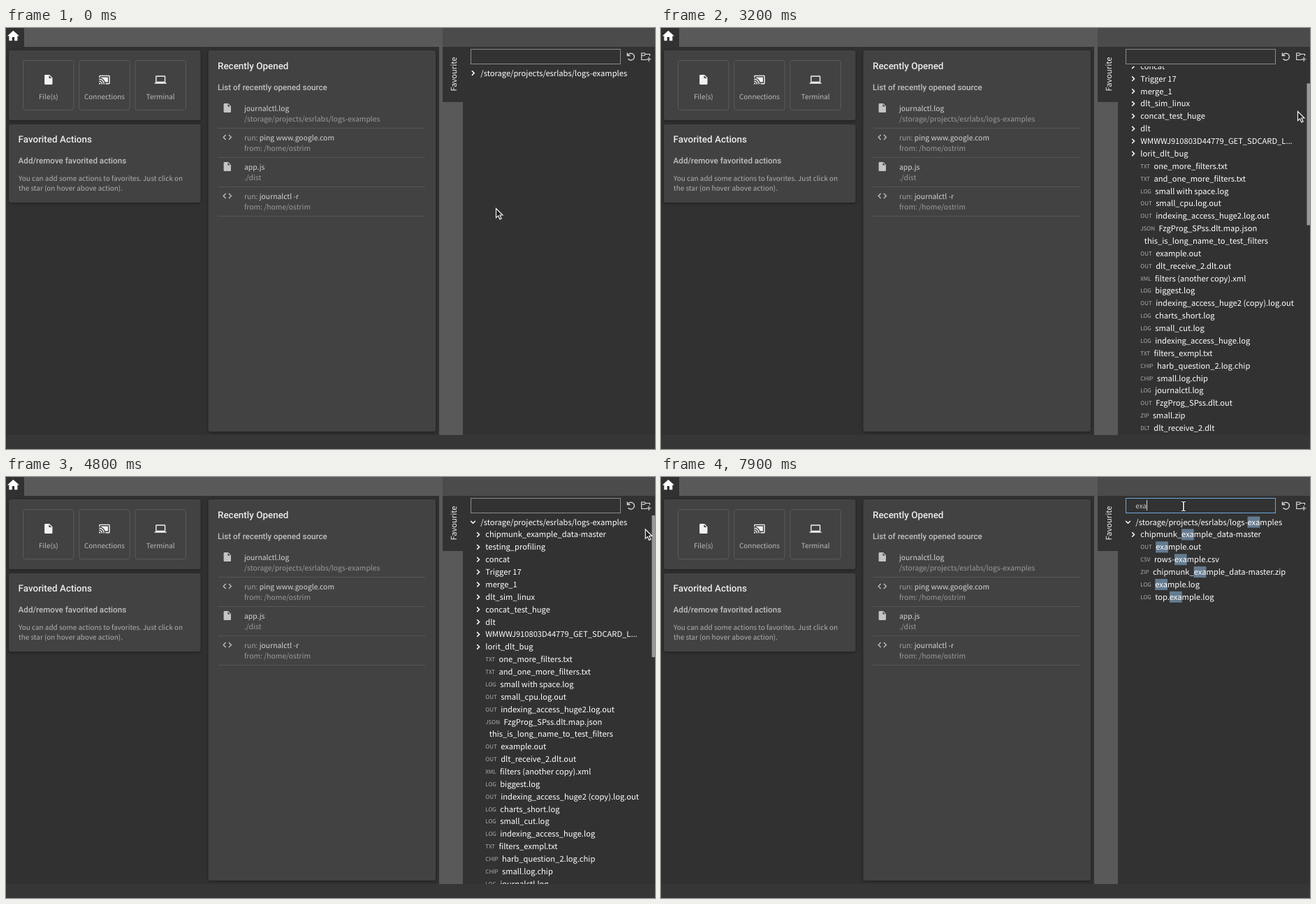
An HTML page with a canvas that plays this animation: 929 by 603 pixels, repeating every 8000 ms.

```html
<!DOCTYPE html>
<html lang="en">
<head>
<meta charset="utf-8">
<title>Favourite folders</title>
<style>
html, body { margin: 0; width: 100%; height: 100%; overflow: hidden; background: #313131; }
canvas { display: block; width: 929px; height: 603px; }
</style>
</head>
<body>
<canvas id="stage"></canvas>
<script>
const W = 929, H = 603, LOOP = 8000;
const ROW = 17.87, TOP = 55, VIEW = 528, FIRST = 64.6;
const NAME = 11.16, TAG = 7.98, ITEM = 10.34, SMALL = 9.92;
const SANS = '"Noto Sans CJK JP", "Noto Sans CJK SC", "Noto Sans CJK", "Noto Sans", sans-serif';
const HEAD = 'Roboto, sans-serif';

const canvas = document.getElementById('stage');
const dpr = window.devicePixelRatio || 1;
canvas.width = W * dpr;
canvas.height = H * dpr;
const ctx = canvas.getContext('2d');

const ICONS = {
  home: 'M10 20v-6h4v6h5v-8h3L12 3 2 12h3v8z',
  file: 'M6 2c-1.1 0-2 .9-2 2v16c0 1.1.9 2 2 2h12c1.1 0 2-.9 2-2V8l-6-6H6zm7 7V3.5L18.5 9H13z',
  cast: 'M1 18v3h3c0-1.66-1.34-3-3-3zm0-4v2c2.76 0 5 2.24 5 5h2c0-3.87-3.13-7-7-7zm18-7H5v1.63c3.96 1.28 7.09 4.41 8.37 8.37H19V7zM1 10v2c4.97 0 9 4.03 9 9h2c0-6.08-4.93-11-11-11zm20-7H3c-1.1 0-2 .9-2 2v3h2V5h18v14h-7v2h7c1.1 0 2-.9 2-2V5c0-1.1-.9-2-2-2z',
  laptop: 'M20 18c1.1 0 2-.9 2-2V6c0-1.1-.9-2-2-2H4c-1.1 0-2 .9-2 2v10c0 1.1.9 2 2 2H0v2h24v-2h-4zM4 6h16v10H4V6z',
  code: 'M9.4 16.6 4.8 12l4.6-4.6L8 6l-6 6 6 6 1.4-1.4zm5.2 0 4.6-4.6-4.6-4.6L16 6l6 6-6 6-1.4-1.4z',
  folder: 'M8.5 5H.7V-4.5H5L6.5-3H12.5V-.5M.7-1.2H5L6.5-3M11.2 1V7.4M8 4.2H14.4',
  arrow: 'M0 0V13.2L3.1 10.4 5.3 15.4 7.6 14.4 5.4 9.5H9.4z'
};
for (const k in ICONS) ICONS[k] = new Path2D(ICONS[k]);

const root = '/storage/projects/esrlabs/logs-examples';
const folders = ['chipmunk_example_data-master', 'testing_profiling', 'concat', 'Trigger 17', 'merge_1',
  'dlt_sim_linux', 'concat_test_huge', 'dlt', 'WMWWJ910803D44779_GET_SDCARD_L...', 'lorit_dlt_bug'];
const files = ['TXT:one_more_filters.txt', 'TXT:and_one_more_filters.txt', 'LOG:small with space.log',
  'OUT:small_cpu.log.out', 'OUT:indexing_access_huge2.log.out', 'JSON:FzgProg_SPss.dlt.map.json',
  ':this_is_long_name_to_test_filters', 'OUT:example.out', 'OUT:dlt_receive_2.dlt.out',
  'XML:filters (another copy).xml', 'LOG:biggest.log', 'OUT:indexing_access_huge2 (copy).log.out',
  'LOG:charts_short.log', 'LOG:small_cut.log', 'LOG:indexing_access_huge.log', 'TXT:filters_exmpl.txt',
  'CHIP:harb_question_2.log.chip', 'CHIP:small.log.chip', 'LOG:journalctl.log', 'OUT:FzgProg_SPss.dlt.out',
  'ZIP:small.zip', 'DLT:dlt_receive_2.dlt', 'CSV:rows-example.csv', 'OUT:text.pcanng.out',
  'LOG:tefis_trace.log', 'TXT:filters_exmpl_tr.txt', 'ZIP:chipmunk_example_data-master.zip',
  'TXT:filters_exmpl (copy).txt', 'LOG:example.log', 'LOG:index_large.log', 'TXT:text_sample.txt',
  'LOG:top.example.log'];
const rows = [{ name: root, x: 679.3, chevron: 668.5 }]
  .concat(folders.map(name => ({ name, x: 686.3, chevron: 675.8 })),
    files.map(f => { const [tag, name] = f.split(':'); return { name, tag, x: 686.3 }; }));

// time, x, y of the pointer tip
const pointer = [[400, 701, 258], [600, 690, 205], [800, 660, 110], [900, 649, 50], [1000, 655, 33],
  [1200, 668, 54], [1300, 670, 62], [1500, 670, 62], [1800, 702, 72], [2100, 768, 87], [2400, 812, 95],
  [2600, 895, 95], [2700, 924, 94], [3000, 924, 94], [3200, 911, 119], [3500, 908, 162], [4000, 908, 162],
  [4100, 906, 152], [4500, 917, 106], [4900, 914, 64], [5000, 888, 56], [5200, 785, 43], [5300, 748, 42]];
const scrolling = [[3000, 0], [3200, 63.4], [3400, 145], [3500, 174.9], [4100, 174.9], [4200, 157],
  [4500, 75.2], [4800, 0]];

function track(keys, t) {
  if (t <= keys[0][0]) return keys[0].slice(1);
  for (let i = 1; i < keys.length; i++) {
    const a = keys[i - 1], b = keys[i];
    if (t <= b[0]) {
      const k = (t - a[0]) / (b[0] - a[0]);
      return a.slice(1).map((v, j) => v + (b[j + 1] - v) * k);
    }
  }
  return keys[keys.length - 1].slice(1);
}

function rect(x, y, w, h, color) {
  ctx.fillStyle = color;
  ctx.fillRect(x, y, w, h);
}

function text(s, x, y, size, color, font = SANS, weight = 400, align = 'left') {
  ctx.font = `${weight} ${size}px ${font}`;
  ctx.fillStyle = color;
  ctx.textAlign = align;
  ctx.fillText(s, x, y);
  return ctx.measureText(s).width;
}

function icon(name, cx, cy, size, color) {
  ctx.save();
  ctx.translate(cx - size / 2, cy - size / 2);
  ctx.scale(size / 24, size / 24);
  ctx.fillStyle = color;
  ctx.fill(ICONS[name]);
  ctx.restore();
}

function line(points, color, width) {
  ctx.beginPath();
  points.forEach(([x, y]) => ctx.lineTo(x, y));
  ctx.strokeStyle = color;
  ctx.lineWidth = width;
  ctx.stroke();
}

function card(x, y, w, h) {
  ctx.save();
  ctx.shadowColor = 'rgba(0,0,0,.4)';
  ctx.shadowBlur = 4 * dpr;
  ctx.shadowOffsetY = dpr;
  ctx.beginPath();
  ctx.roundRect(x, y, w, h, 3);
  ctx.fillStyle = '#424242';
  ctx.fill();
  ctx.restore();
}

function drawFrame() {
  rect(0, 0, W, H, '#313131');
  rect(26, 0, 599, 27, '#595959');
  rect(625, 0, 304, 27, '#4b4b4b');
  icon('home', 10.4, 11.4, 20.5, '#fff');
  rect(620, 27, 34, 556, '#595959');
  rect(625, 27, 29, 79, '#323232');
  rect(654, 27, 275, 556, '#323232');
  rect(0, 583, W, 20, '#363636');

  ctx.save();
  ctx.translate(645, 66);
  ctx.rotate(-Math.PI / 2);
  text('Favourite', 0, 0, NAME, '#f0f0f0', SANS, 400, 'center');
  ctx.restore();
}

function drawCards() {
  card(4, 32, 274.5, 100);
  card(4, 138, 274.5, 112);
  card(289.5, 32, 325.5, 546);

  [['file', 'File(s)'], ['cast', 'Connections'], ['laptop', 'Terminal']].forEach(([name, label], i) => {
    const x = 24.5 + i * 80.2;
    ctx.beginPath();
    ctx.roundRect(x, 46.5, 72.5, 71, 3);
    ctx.strokeStyle = '#5b5b5b';
    ctx.lineWidth = 1;
    ctx.stroke();
    icon(name, x + 36.3, 74, 17, '#f2f2f2');
    text(label, x + 36.3, 102, SMALL, '#bcbcbc', SANS, 400, 'center');
  });

  text('Favorited Actions', 17.6, 163.7, 13.45, '#ececec', HEAD, 500);
  text('Add/remove favorited actions', 17.6, 194, 11.62, '#c2c2c2', HEAD, 500);
  text('You can add some actions to favorites. Just click on', 18, 219, SMALL, '#b0b0b0');
  text('the star (on hover above action).', 18, 233.3, SMALL, '#b0b0b0');

  text('Recently Opened', 303, 58.5, 13.45, '#ececec', HEAD, 500);
  text('List of recently opened source', 303, 88.5, 11.62, '#c2c2c2', HEAD, 500);
  [['file', '', 'journalctl.log', root],
   ['code', 'run: ', 'ping www.google.com', 'from: /home/ostrim'],
   ['file', '', 'app.js', './dist'],
   ['code', 'run: ', 'journalctl -r', 'from: /home/ostrim']].forEach(([name, lead, title, sub], i) => {
    const y = 42 * i;
    icon(name, 316.8, 114.5 + y, 15.6, '#c4c4c4');
    const w = lead ? text(lead, 341, 118.8 + y, ITEM, '#a0a0a0') : 0;
    text(title, 341 + w, 118.8 + y, ITEM, '#d4d4d4');
    text(sub, 341, 134 + y, ITEM, '#9a9a9a');
    rect(303.5, 143 + y, 296.5, 1, '#565656');
  });
}

function drawSearch(t, query, x, y) {
  const over = x > 665 && x < 880 && y > 30 && y < 52;
  const color = t >= 5500 ? '#6ea8dc' : over ? '#b8b8b8' : '#8c8c8c';
  ctx.strokeStyle = color;
  ctx.lineWidth = 1;
  ctx.strokeRect(665.5, 30.5, 214, 21);
  const w = text(query, 679.3, 44.7, SMALL, '#c8c8c8');
  const blink = (t >= 6100 && t < 6300) || (t >= 7300 && t < 7900);
  if (t >= 5600 && !blink) rect(Math.round(679 + w), query ? 33 : 34, 1, 15, '#d8d8d8');

  ctx.strokeStyle = '#e2e2e2';
  ctx.lineWidth = 1.3;
  ctx.beginPath();
  ctx.arc(894.5, 41.2, 4.9, -2.6, 2.5);
  ctx.stroke();
  line([[889.4, 35.5], [889.4, 39.5], [893.4, 39.5]], '#e2e2e2', 1.3);
  ctx.save();
  ctx.translate(909, 40.5);
  ctx.lineWidth = 1.1;
  ctx.stroke(ICONS.folder);
  ctx.restore();
  return over;
}

function drawRow(row, y, query, open) {
  const base = y + 4;
  let x = row.x;
  if (row.chevron) {
    const c = row.chevron;
    line(open ? [[c - 3.3, y - 1.6], [c, y + 1.7], [c + 3.3, y - 1.6]]
              : [[c - 1.6, y - 3.3], [c + 1.7, y], [c - 1.6, y + 3.3]], '#fff', 1.5);
  } else {
    x += text(row.tag, x, base - 1, TAG, '#b0b0b0') + 5.4;
  }
  ctx.font = `400 ${NAME}px ${SANS}`;
  ctx.textAlign = 'left';
  if (query) {
    const low = row.name.toLowerCase();
    for (let i = low.indexOf(query); i >= 0; i = low.indexOf(query, i + query.length)) {
      const before = ctx.measureText(row.name.slice(0, i)).width;
      const w = ctx.measureText(row.name.slice(i, i + query.length)).width;
      rect(x + before, y - 8, w, 16, '#647b90');
    }
  }
  text(row.name, x, base, NAME, '#fff');
}

function drawTree(t, query, x, y) {
  const open = t >= 1600;
  const shown = open ? rows.filter(r => r.name.toLowerCase().includes(query)) : [rows[0]];
  const scroll = track(scrolling, t)[0];
  ctx.save();
  ctx.beginPath();
  ctx.rect(654, TOP, 275, VIEW);
  ctx.clip();
  const hover = Math.floor((y - FIRST) / ROW + .5);
  if (t < 2700 && x >= 654 && hover >= 0 && hover < shown.length)
    rect(654, Math.round(FIRST + (hover - .5) * ROW), open ? 270.5 : 275, 18, '#464646');
  shown.forEach((row, i) => drawRow(row, FIRST + i * ROW - scroll, query, open && i === 0));
  const content = open ? ({ '': 1373, e: 930 })[query] : 0;
  if (content) rect(924.5, TOP + scroll * VIEW / content, 4.5, VIEW * VIEW / content, '#9a9a9a');
  ctx.restore();
}

function drawPointer(x, y, beam) {
  ctx.save();
  ctx.translate(x, y);
  if (beam) {
    const bars = [[-3, -6.5], [-1, -6.5], [0, -5.5], [0, 5.5], [-1, 6.5], [-3, 6.5]];
    const mirror = bars.map(([a, b]) => [-a, b]);
    for (const [color, width] of [['#1c1c1c', 3], ['#f4f4f4', 1.2]]) {
      line(bars, color, width);
      line(mirror, color, width);
    }
  } else {
    ctx.translate(.5, .5);
    ctx.fillStyle = '#1e1e1e';
    ctx.fill(ICONS.arrow);
    ctx.strokeStyle = '#f4f4f4';
    ctx.lineWidth = 1.2;
    ctx.stroke(ICONS.arrow);
  }
  ctx.restore();
}

function draw(t) {
  ctx.setTransform(dpr, 0, 0, dpr, 0, 0);
  ctx.textRendering = 'geometricPrecision';
  const query = 'exa'.slice(0, t < 6300 ? 0 : t < 6500 ? 1 : t < 6700 ? 2 : 3);
  const [x, y] = track(pointer, t);
  drawFrame();
  drawCards();
  drawTree(t, query, x, y);
  const beam = drawSearch(t, query, x, y);
  drawPointer(x, y, beam);
}

const start = performance.now();
function tick() {
  const t = (performance.now() - start) % LOOP;
  draw(Math.floor(t / 100) * 100); // the screen updates ten times a second
  requestAnimationFrame(tick);
}
tick();
</script>
</body>
</html>
```
